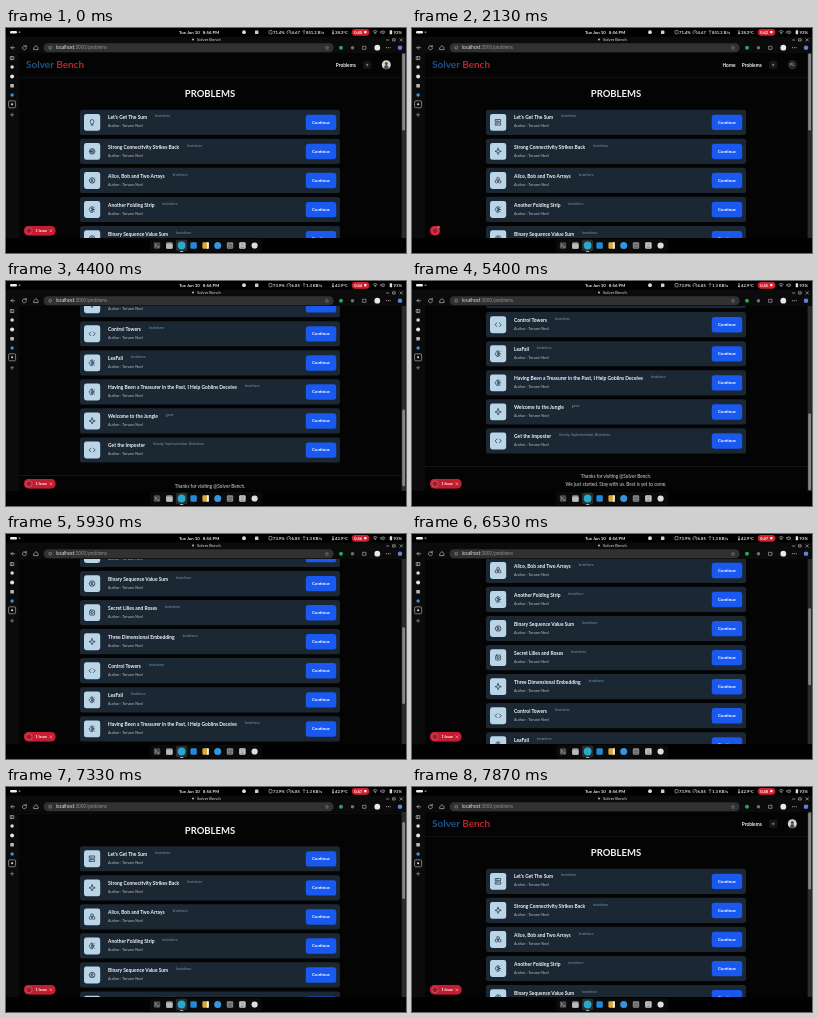
Recreate the animation shown at these times as an HTML page. Size 400 by 225 pixels, loop 8000 ms.

```html
<!DOCTYPE html>
<html lang="en">
<head>
<meta charset="utf-8">
<title>Problems</title>
<style>
  html, body { margin: 0; width: 100%; height: 100%; overflow: hidden; background: #000; }
  svg { display: block; width: 100%; height: 100%; }
  text { font-family: Lato, "Open Sans", sans-serif; white-space: pre; }
  .b { font-weight: 700; }
  .line { fill: none; stroke-linecap: round; stroke-linejoin: round; }
</style>
</head>
<body>
<svg id="stage" viewBox="0 0 400 225" preserveAspectRatio="none"></svg>
<script>
const LOOP = 8000, STEP = 200 / 3;
const BRAND = ['Solver', 'Bench'];
const AUTHOR = 'Torvam Neel';
const PITCH = 29.06, FIRST = 81.7;

// Scroll keys: time, offset
const SCROLL = [
  [0, 0], [2130, 0], [2730, 120], [2900, 120], [3066, 168], [3925, 168], [3930, 176],
  [4530, 254.4], [5380, 254.4], [5930, 161], [6070, 161], [6330, 130], [6400, 130],
  [6730, 91], [6870, 91], [7530, 4], [7610, 4], [7860, 0], [8000, 0]
];
const TICKS = [530, 1530, 2530, 3930, 4530, 5530, 6530, 7530];
const RELOAD = 1600, SIGNED_IN = 2260, STATS = 2530;

const ring = (r, x = 12, y = 12) => `M${x - r} ${y}a${r} ${r} 0 1 0 ${2 * r} 0a${r} ${r} 0 1 0 ${-2 * r} 0`;
const cube = (x, y) => `M${x} ${y - 4.5}l4 2.2v4.6l-4 2.2-4-2.2v-4.6z`;
const ICONS = {
  bulb: 'M9 17c0-3-3-4-3-8a6 6 0 0 1 12 0c0 4-3 5-3 8zM9 21h6',
  target: ring(9) + ring(5.5) + ring(2),
  user: ring(9) + ring(3, 12, 10) + 'M7 18c1-5 9-5 10 0',
  brain: 'M12 3c-4-1-6 2-6 4c-4 2-4 7-1 9c0 4 4 6 7 5M12 3v18M12 9H9M12 15H9M19 4l-4 4v8l4 4M20 12h-4',
  rows: 'M4 3h16v7H4zM4 14h16v7H4zM8 6.5h1M8 17.5h1',
  spark: 'M12 2l2.6 7.4L22 12l-7.4 2.6L12 22l-2.6-7.4L2 12l7.4-2.6z',
  cubes: cube(12, 7) + cube(7, 16) + cube(17, 16),
  chip: 'M7 4h10q3 0 3 3v10q0 3-3 3H7q-3 0-3-3V7q0-3 3-3z' + ring(4),
  code: 'M8 6l-6 6 6 6M16 6l6 6-6 6'
};

// Title, tag, icon, icon before the reload
const PROBLEMS = [
  ["Let's Get The Sum", 'bruteforce', 'rows', 'bulb'],
  ['Strong Connectivity Strikes Back', 'bruteforce', 'spark', 'target'],
  ['Alice, Bob and Two Arrays', 'bruteforce', 'cubes', 'user'],
  ['Another Folding Strip', 'bruteforce', 'brain'],
  ['Binary Sequence Value Sum', 'bruteforce', 'user'],
  ['Secret Lilies and Roses', 'bruteforce', 'chip'],
  ['Three Dimensional Embedding', 'bruteforce', 'spark'],
  ['Control Towers', 'bruteforce', 'code'],
  ['LeaFall', 'bruteforce', 'brain'],
  ['Having Been a Treasurer in the Past, I Help Goblins Deceive', 'bruteforce', 'brain'],
  ['Welcome to the Jungle', 'game', 'spark'],
  ['Get the Imposter', 'Greedy, Implementation, Bruteforce', 'code']
];

const rect = (x, y, w, h, fill, r = 0, more = '') =>
  `<rect x="${x}" y="${y}" width="${w}" height="${h}" rx="${r}" fill="${fill}" ${more}/>`;
const dot = (x, y, r, fill, more = '') => `<circle cx="${x}" cy="${y}" r="${r}" fill="${fill}" ${more}/>`;
const text = (x, y, size, fill, str, more = '') =>
  `<text x="${x}" y="${y}" font-size="${size}" fill="${fill}" ${more}>${str}</text>`;
const line = (d, color, w = 0.7) =>
  `<path class="line" d="${d}" stroke="${color}" stroke-width="${w}"/>`;
const BOLD = 'class="b"', MID = 'text-anchor="middle"';

function card([title, tag, icon, early], i) {
  const mark = (name, cls) =>
    `<g class="${cls}" transform="translate(82.4 8.9) scale(.31)">${line(ICONS[name], '#17293a', 2.2)}</g>`;
  const icons = early ? mark(icon, 'late') + mark(early, 'early') : mark(icon, '');
  return `<g transform="translate(0 ${FIRST + i * PITCH})">
    ${rect(74, 0, 260, 25.2, '#1b2732', 2.6)}
    ${rect(78, 4.2, 16.2, 16.9, '#b9d5e7', 2.4)}${icons}
    <text x="102" y="9.8" font-size="4.92" fill="#f1f4f7" class="b">${title}<tspan dx="8" dy="-2" font-size="3.25" font-weight="400" fill="#8495a4">${tag}</tspan></text>
    ${text(102, 17.8, 3.75, '#b3bcc6', 'Author : ' + AUTHOR)}
    ${rect(299.8, 5, 30.4, 15.4, '#1959ef', 2.6)}
    ${text(315, 14, 4.4, '#fff', 'Continue', BOLD + ' ' + MID)}
  </g>`;
}

function page() {
  return `
    ${text(20, 40.3, 10, '#1c5389', `${BRAND[0]} <tspan fill="#b8242e">${BRAND[1]}</tspan>`, BOLD)}
    <g id="guest">
      ${text(310.5, 38.6, 4.8, '#eee', 'Home', BOLD)}
      ${dot(380.3, 36.8, 4.5, '#26282b')}${text(380.3, 38.1, 3.5, '#ddd', 'PL', MID)}
    </g>
    <g id="member">
      ${dot(380.3, 36.8, 4.5, '#d3d5d2')}${dot(380.3, 35.4, 1.5, '#4c4b49')}
      <path d="M378 40.5c0-4.6 4.6-4.6 4.6 0q-2.3 1.4-4.6 0z" fill="#4c4b49"/>
    </g>
    ${text(329.8, 38.6, 4.8, '#eee', 'Problems', BOLD)}
    ${rect(357, 32.7, 8.4, 8.4, '#141517', 1.6)}${dot(361.2, 36.9, 0.8, '#a5a5a5')}
    ${line('M361.2 35.2v.1M361.2 38.5v.1M359.5 36.9h.1M362.8 36.9h.1', '#808080', 0.4)}
    ${rect(13, 49, 383, 0.5, '#1b1b1c')}
    ${text(204, 69.3, 9.5, '#f4f4f4', 'PROBLEMS', BOLD + ' ' + MID)}
    ${PROBLEMS.map(card).join('')}
    ${rect(13, 439.4, 383, 0.5, '#26282a')}
    ${text(204, 451.5, 4.7, '#d5d8db', `Thanks for visiting @${BRAND.join(' ')}.`, MID)}
    ${text(204, 458.9, 4.7, '#d5d8db', 'We just started. Stay with us. Best is yet to come.', MID)}`;
}

function topBar() {
  const stat = (x, id) => text(x, 5.7, 4.2, '#e4e4e4', '', `${BOLD} id="${id}"`);
  return `
    ${rect(4, 3, 7, 2.4, '#eee', 1.2)}${dot(13.5, 4.2, 1, '#777')}
    ${text(173, 5.7, 4.35, '#eee', 'Tue Jun 10   8:56 PM', BOLD)}
    ${dot(238, 4.2, 1.9, '#ddd')}${rect(249, 2.4, 3.4, 3.6, '#ccc', 0.6)}
    ${rect(263, 2.5, 3, 3.3, 'none', 0.5, 'stroke="#ccc" stroke-width=".6"')}
    ${line('M281.4 5.8a2 2 0 1 1 3 0M283 4.8l.8-1.2', '#ccc', 0.6)}
    ${line('M298 2.5v3.4M297 3.4l1-1 1 1', '#ccc', 0.5)}
    ${line('M327 2.4v2.4', '#ccc', 0.8)}${dot(327, 5.4, 0.9, '#ccc')}
    ${stat(267, 'mem')}${stat(285.6, 'load')}${stat(300, 'net')}${stat(329, 'temp')}
    ${rect(345.8, 0.9, 17.6, 6.8, '#d3202f', 3.4)}
    ${text(348.3, 5.5, 3.9, '#fff', '', BOLD + ' id="clock"')}${rect(358.2, 3.1, 2.2, 2.2, '#fff', 0.3)}
    ${line('M367.2 3.2q2-1.6 4 0M368.2 4.5q1-.7 2 0', '#ddd', 0.6)}${dot(369.2, 5.6, 0.5, '#ddd')}
    ${line('M375 3.5h1l1.2-1v3.5l-1.2-1h-1zM378.5 3.2q.8 1 0 2', '#ddd', 0.5)}
    ${rect(383.7, 2.3, 2.4, 3.9, '#ddd', 0.5)}${text(387.6, 5.7, 4.2, '#e4e4e4', '93%', BOLD)}`;
}

function browser() {
  return `
    ${rect(0, 8.6, 400, 16.4, '#0b0b0c')}${rect(0, 25, 13, 185, '#0b0b0c')}
    ${dot(187, 11.5, 0.9, '#ccc')}${text(191, 13, 4.15, '#dedede', BRAND.join(' '))}
    ${line('M380.5 12h2.4M387 10.8h2.2v2.2H387zM394 10.7l2.4 2.4M396.4 10.7l-2.4 2.4', '#ccc', 0.6)}
    ${line('M8.6 19.7H5M6.6 18.1L5 19.7l1.6 1.6', '#bbb')}
    ${line('M20 18.4a2 2 0 1 0 .5 1.6M20.3 17.3v1.4h-1.4', '#bbb')}
    ${line('M28 19.4l2-1.8 2 1.8v2.2h-4z', '#bbb')}
    ${rect(37.6, 15.2, 290, 9, '#303133', 4.5)}
    ${dot(44.2, 19.7, 1.4, 'none', 'stroke="#aaa" stroke-width=".6"')}
    ${text(50, 21.3, 4.65, '#e2e2e2', 'localhost<tspan fill="#929292">:3000/problems</tspan>')}
    ${line('M321 18.2l.5 1.1 1.2.1-.9.8.3 1.2-1.1-.6-1.1.6.3-1.2-.9-.8 1.2-.1z', '#999', 0.4)}
    ${dot(335, 19.7, 2, '#25a853')}${dot(346.5, 19.7, 1.8, '#66717a')}
    ${line('M357 18.3h3v3h-3z', '#bbb', 0.6)}${dot(371.3, 19.7, 2.9, '#e9e9e9')}
    ${line('M380.5 19.7h.1M382.3 19.7h.1M384.1 19.7h.1', '#ccc', 0.9)}${dot(394, 19.7, 2.3, '#5b83d6')}
    ${line('M4.6 28.6h3.2v3H4.6zM5.8 28.6v3', '#ccc', 0.6)}
    ${dot(6.1, 39, 1.8, '#d8d8d8')}${dot(6.1, 48.4, 2, '#e4e4e4')}
    ${rect(4.3, 56, 3.6, 3.6, '#b8b8b8', 0.6)}${dot(6.1, 67, 1.7, '#3d8fd8')}
    ${rect(2.6, 72.8, 7, 7, '#0e0e0f', 1.2, 'stroke="#a8a8a8" stroke-width=".7"')}${dot(6.1, 76.3, 1, '#e6e6e6')}
    ${line('M4.5 86.8h3.2M6.1 85.2v3.2', '#aaa', 0.6)}`;
}

function dock() {
  const item = (x, color, r = 1.2) => rect(x - 3.2, 214.3, 6.4, 6.4, color, r);
  return `${rect(0, 210, 400, 15, '#020202')}${rect(144, 211, 112, 13.4, '#0a0a0b', 3)}
    ${rect(169.9, 211.8, 11.4, 11.4, '#2b2c2e', 2)}
    ${item(151, '#4a4b4d')}${line('M149 216l1.4 1.3-1.4 1.3M151.5 219h1.6', '#ccc', 0.6)}
    ${item(163.4, '#8d8f91')}${rect(160.2, 215.8, 6.4, 4.9, '#b9bbbc', 0.8)}
    ${dot(175.6, 217.5, 3.9, '#2aa7c9')}${item(187.6, '#2489d3')}
    ${item(199.6, '#d9a93c')}${rect(200.9, 214.3, 1.9, 6.4, '#eee')}
    ${dot(211.7, 217.5, 3.5, '#3296e3')}
    ${item(224, '#8b8d90')}${line('M222 216.2h4M222 217.8h4M222 219.4h4', '#333', 0.5)}
    ${item(236.4, '#d6d7d8')}${line('M234.8 216h3.2M234.8 218h3.2M234.8 219.7h3.2', '#555', 0.6)}
    ${dot(248.6, 217.5, 3.1, '#dedede')}
    ${rect(173.8, 223.2, 3.6, 0.7, '#ddd', 0.3)}`;
}

const stage = document.getElementById('stage');
stage.innerHTML = `
  <defs>
    <clipPath id="view"><rect x="13" y="25" width="387" height="185"/></clipPath>
    <clipPath id="pill"><rect id="pillClip" x="17.8" y="197.8" height="10" rx="5"/></clipPath>
  </defs>
  ${rect(0, 0, 400, 225, '#000')}${topBar()}${browser()}
  <g clip-path="url(#view)">
    ${rect(13, 25, 387, 185, '#040404', 2)}
    <g id="page">${page()}</g>
    ${rect(395.6, 25, 4.4, 185, '#2a2b2c')}${rect(396.2, 25.6, 2.8, 77, '#858687', 1.4, 'id="thumb"')}
    <g clip-path="url(#pill)">
      ${rect(17.8, 197.8, 32, 10, '#c41c30')}${dot(23, 202.8, 3.1, '#a31a2b', 'stroke="#e58791" stroke-width=".5"')}
      <g id="issue">${text(29.5, 204.2, 3.7, '#fff', '1 Issue', BOLD)}${line('M43.8 201.7l2.2 2.2M46 201.7l-2.2 2.2', '#f3c9cd', 0.55)}</g>
    </g>
    ${dot(26.4, 199.2, 1.4, '#d9535f', 'id="count"')}
  </g>
  ${dock()}`;

const el = Object.fromEntries([...stage.querySelectorAll('[id]')].map(n => [n.id, n]));
const late = stage.querySelectorAll('.late'), early = stage.querySelectorAll('.early');
const show = (node, on) => node.setAttribute('display', on ? 'inline' : 'none');
const smooth = u => u * u * (3 - 2 * u);

function scrollAt(t) {
  const i = SCROLL.findIndex(k => k[0] > t);
  const [t0, a] = SCROLL[i - 1], [t1, b] = SCROLL[i];
  return a + (b - a) * smooth((t - t0) / (t1 - t0));
}

function draw(now) {
  const t = Math.floor((now % LOOP + 4) / STEP) * STEP % LOOP;
  const y = scrollAt(t);
  el.page.setAttribute('transform', `translate(0 ${-y})`);
  el.thumb.setAttribute('y', 25.6 + y * 0.42);

  const fresh = t >= RELOAD, guest = fresh && t < SIGNED_IN;
  show(el.guest, guest);
  show(el.member, !guest);
  late.forEach(n => show(n, fresh));
  early.forEach(n => show(n, !fresh));

  const open = fresh ? smooth(Math.min(1, Math.max(0, (t - SIGNED_IN) / 270))) : 1;
  el.pillClip.setAttribute('width', 10.4 + 21.6 * open);
  show(el.issue, open > 0.2);
  show(el.count, open < 0.2);

  const stats = t < STATS ? ['71.4%', '4.67', '851.2 B/s', '38.3°C'] : ['73.9%', '6.85', '1.3 KB/s', '42.9°C'];
  ['mem', 'load', 'net', 'temp'].forEach((id, i) => { el[id].textContent = stats[i]; });
  el.clock.textContent = '0:' + (40 + TICKS.filter(k => k <= t + 4).length);
}

const start = performance.now();
function loop() {
  draw(performance.now() - start);
  requestAnimationFrame(loop);
}
loop();
</script>
</body>
</html>
```
